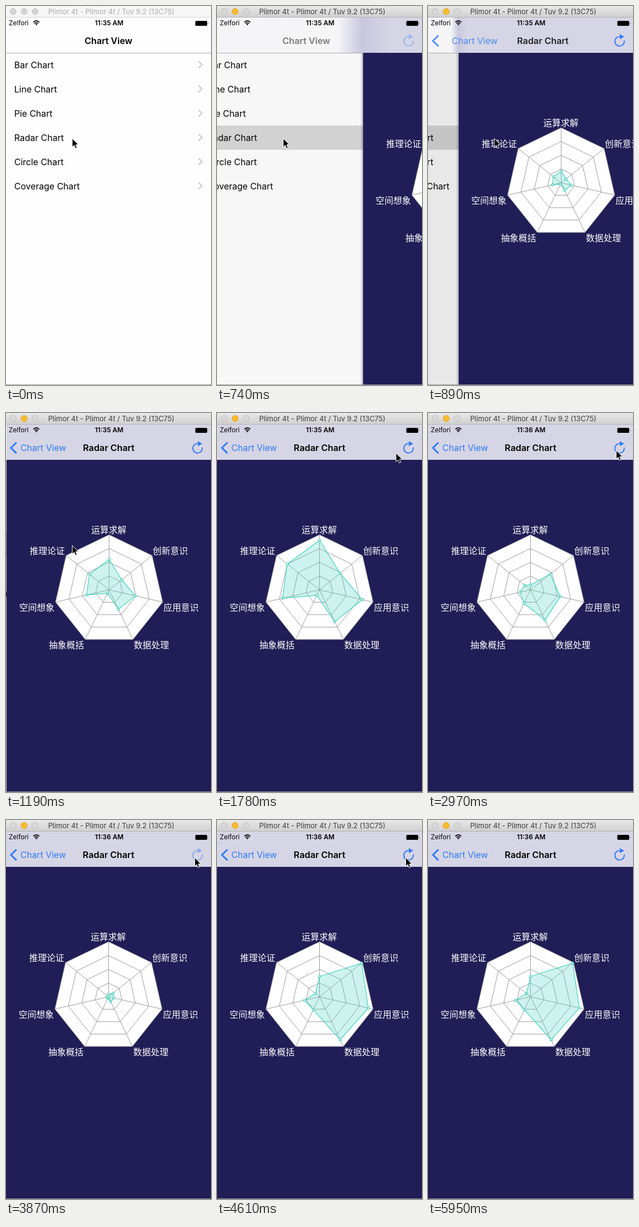
An HTML page that plays this animation: 373x688 px, repeating every 6220 ms.

```html
<!DOCTYPE html>
<html lang="en">
<head>
<meta charset="utf-8">
<title>Chart View</title>
<style>
  html, body { margin: 0; width: 100%; height: 100%; overflow: hidden; background: #fff; }
  svg { display: block; width: 100%; height: 100%; }
  text { font: 16px Inter, Roboto, sans-serif; }
  .mid { text-anchor: middle; }
  .title { font-size: 16.3px; font-weight: 600; }
  .status { font-size: 12px; }
  .bold { font-weight: 600; }
  .window { font-size: 12.9px; }
  .label { font: 16px "Noto Sans CJK SC", "Noto Sans CJK", sans-serif; fill: #fff; }
  .blue { fill: #2f7bf6; }
  .line { fill: none; stroke: #2f7bf6; }
  .web { fill: none; stroke: #9b9b9f; stroke-width: 1; }
  .data { fill: #3fd0bb; fill-opacity: .25; stroke: #3fd3be; stroke-width: 1.2; stroke-linejoin: round; }
  .dot { fill: #fff; stroke: #3fcdb9; stroke-width: 1.2; }
</style>
</head>
<body>
<svg viewBox="0 0 373 688" preserveAspectRatio="none">
  <defs>
    <linearGradient id="active" x2="0" y2="1">
      <stop stop-color="#e9e8e9"/><stop offset="1" stop-color="#d1d0d1"/>
    </linearGradient>
    <linearGradient id="shade">
      <stop stop-color="#000" stop-opacity="0"/><stop offset="1" stop-color="#000" stop-opacity=".22"/>
    </linearGradient>
    <linearGradient id="glass" gradientUnits="userSpaceOnUse" y1="0" y2="0">
      <stop stop-color="#f5f5f7"/><stop offset=".45" stop-color="#c8c7df"/><stop offset="1" stop-color="#d6d5e5"/>
    </linearGradient>
  </defs>

  <g id="list">
    <rect y="85" width="373" height="603" fill="#fefefe"/>
    <rect id="pressed" y="217" width="373" height="44" fill="#d8d8d8"/>
    <g id="rows"></g>
  </g>
  <rect id="dim" y="85" width="373" height="603"/>

  <g id="page">
    <rect x="-5" y="85" width="5" height="603" fill="url(#shade)"/>
    <rect y="85" width="374" height="603" fill="#211d56"/>
    <g id="web"></g>
    <g id="data"></g>
  </g>

  <rect y="20" width="373" height="65" fill="#fdfdfd"/>
  <rect id="bar" y="20" width="373" height="65" fill="url(#glass)"/>
  <rect id="rule" y="85" width="373" height="1" fill="#aaa9ad"/>
  <rect y="687" width="373" height="1" fill="#98979d"/>

  <text id="oldTitle" class="title mid" x="186.5" y="69">Chart View</text>
  <path id="back" class="line" stroke-width="3" d="M19 53.5L9 63.3L19 73.1"/>
  <text id="backText" class="blue" x="26" y="69">Chart View</text>
  <text id="newTitle" class="title mid" x="186.5" y="69">Radar Chart</text>
  <g id="refresh">
    <path class="line" stroke-width="2" d="M348.5 55.5A8.6 8.6 0 1 0 357 62.5"/>
    <path class="blue" d="M349 51L357 55.8L349 60.3Z"/>
  </g>

  <text class="status" x="5" y="35.3">Zelfori</text>
  <g fill="none" stroke="#000" stroke-width="1.8">
    <path d="M49.7 29.4Q55.2 24.6 60.7 29.4M51.9 31.8Q55.2 28.9 58.5 31.8"/>
    <path d="M53.3 33L55.2 35.2L57.1 33Q55.2 31.7 53.3 33Z" fill="#000" stroke="none"/>
  </g>
  <text id="clock" class="status bold mid" x="187.7" y="35.3"></text>
  <rect x="344.5" y="27" width="21.5" height="9" rx="1.5"/>
  <path d="M367 29.7Q368.6 31.5 367 33.3Z"/>

  <rect id="frame" width="373" height="20"/>
  <rect id="frameEdge" y="20" width="373" height="1"/>
  <g id="lights"></g>
  <text id="caption" class="window mid" x="191.5" y="15">Plimor 4t - Plimor 4t / Tuv 9.2 (13C75)</text>

  <path id="cursor" d="M0 0V15.6L3.6 12.3L6 17.9L8.7 16.8L6.3 11.3H11.2Z" stroke="#fff" stroke-width="1"/>
</svg>

<script>
const LOOP = 6220, STEP = 14.875, WIDTH = 373, GROW = 800;
const CX = 186.5, CY = 321, RADIUS = 100, SIDES = 7;
const $ = id => document.getElementById(id);
const clamp = v => Math.max(0, Math.min(1, v));
const set = (el, attrs) => { for (const k in attrs) el.setAttribute(k, attrs[k]); return el; };
const add = (parent, tag, attrs, text = '') => {
  const el = set(document.createElementNS('http://www.w3.org/2000/svg', tag), attrs);
  el.textContent = text;
  return parent.appendChild(el);
};
const spoke = (i, v) => {
  const a = i * 2 * Math.PI / SIDES;
  return [CX + RADIUS * v * Math.sin(a), CY - RADIUS * v * Math.cos(a)];
};
const ring = values => values.map((v, i) => spoke(i, v).map(n => n.toFixed(2))).join(' ');

// Each run grows from the centre, starting at the given time.
const runs = [
  { start: 702, values: [.9, .48, .8, .64, .11, .69, .75] },
  { start: 2288, values: [.13, .68, .82, .9, .4, .29, .2] },
  { start: 3782, values: [.37, .98, .91, .865, .26, .28, .095] }
];
const presses = [2230, 3720];

// Pointer path: time, x, y
const path = [
  [0, 120.5, 240.5], [1190, 120.5, 240.5], [1340, 152, 220], [1480, 262, 130],
  [1630, 325, 73], [1780, 336, 71], [1930, 342.5, 68], [3120, 342.5, 68],
  [3720, 343.5, 68.5], [4610, 343.5, 68.5], [5060, 345, 80], [5210, 350, 130],
  [5360, 345, 230], [5500, 322, 370], [5650, 292, 520], [5800, 262, 660], [5950, 250, 700]
];

['Bar', 'Line', 'Pie', 'Radar', 'Circle', 'Coverage'].forEach((name, i) => {
  const y = 106.5 + 44 * i;
  add($('rows'), 'text', { x: 15, y: y + 6 }, name + ' Chart');
  add($('rows'), 'path', {
    d: `M350.5 ${y - 6}L356.5 ${y}L350.5 ${y + 6}`, fill: 'none', stroke: '#c7c7cc', 'stroke-width': 1.9
  });
});

const lights = [13, 33, 53].map(cx => add($('lights'), 'circle', { cx, cy: 10, r: 5.6 }));

add($('web'), 'polygon', { points: ring(Array(SIDES).fill(1)), fill: '#fff' });
for (let k = 1; k <= 4; k++)
  add($('web'), 'polygon', { points: ring(Array(SIDES).fill(k / 4)), class: 'web' });
for (let i = 0; i < SIDES; i++) {
  const [x2, y2] = spoke(i, 1);
  add($('web'), 'line', { x1: CX, y1: CY, x2, y2, class: 'web' });
}
[
  ['运算求解', 154, 212], ['创新意识', 266, 250], ['应用意识', 285.5, 353], ['数据处理', 231.5, 421],
  ['抽象概括', 77, 421], ['空间想象', 23, 353], ['推理论证', 42, 250]
].forEach(([s, x, y]) => add($('web'), 'text', { x, y: y + 6, class: 'label' }, s));

const area = add($('data'), 'polygon', { class: 'data' });
const dots = runs[0].values.map(() => add($('data'), 'circle', { r: 2, class: 'dot' }));

const tickTime = k => 10 * Math.round(k * STEP);
function snap(t) {
  let k = Math.floor(t / (10 * STEP)) + 1;
  while (tickTime(k) > t) k--;
  return tickTime(k);
}

function push(t) {
  const w = Math.max(0, t - 671) * .01542;
  const p = 1 - (1 + w) * Math.exp(-w);
  return p > .998 ? 1 : p;
}

function drawWindow(active) {
  set($('frame'), { fill: active ? 'url(#active)' : '#f6f6f6' });
  set($('frameEdge'), { fill: active ? '#b3b2b6' : '#d5d5d5' });
  set($('caption'), { fill: active ? '#3c3c3c' : '#adadad' });
  lights.forEach((el, i) => set(el, !active ? { fill: '#d3d3d3', stroke: '#cacaca' }
    : i === 1 ? { fill: '#f8bd2f', stroke: '#e0a32a' } : { fill: '#d9d8d9', stroke: '#bfbebf' }));
}

function drawPush(t) {
  const p = push(t), edge = WIDTH * (1 - p), shift = -116 * .72 * p;
  const late = clamp((p - .35) / .6);
  set($('list'), { transform: `translate(${-.3 * WIDTH * p})` });
  set($('pressed'), { opacity: t >= 600 ? 1 : 0 });
  set($('dim'), { opacity: .1 * p });
  set($('page'), { transform: `translate(${edge})`, opacity: p > 0 ? 1 : 0 });
  set($('rule'), { width: edge });
  set($('bar'), { opacity: p > 0 ? 1 : 0 });
  const blur = Math.min(1, (1 - p) * 2);
  set($('glass'), { x1: edge - 45 * blur, x2: edge + 50 * blur + .01 });
  set($('oldTitle'), { transform: `translate(${shift})`, opacity: clamp(1 - 1.75 * p) });
  set($('backText'), { transform: `translate(${116 * (1 - p)})`, opacity: late });
  set($('back'), { opacity: late });
  set($('newTitle'), { transform: `translate(${150 * (1 - p)})`, opacity: late });
  return p;
}

function drawData(t) {
  const run = runs.filter(r => t >= r.start).pop();
  set($('data'), { opacity: run ? 1 : 0 });
  if (!run) return;
  const grown = clamp((t - run.start) / GROW);
  const values = run.values.map(v => v * grown);
  set(area, { points: ring(values) });
  dots.forEach((dot, i) => {
    const [cx, cy] = spoke(i, values[i]);
    set(dot, { cx, cy });
  });
}

function drawCursor(t) {
  let i = path.findIndex(p => p[0] > t);
  if (i < 0) i = path.length - 1;
  const [t0, x0, y0] = path[i - 1], [t1, x1, y1] = path[i];
  const f = clamp((t - t0) / (t1 - t0));
  set($('cursor'), { transform: `translate(${x0 + (x1 - x0) * f} ${y0 + (y1 - y0) * f})` });
}

function draw(t) {
  drawWindow(t >= 600);
  const p = drawPush(t);
  const held = presses.map(s => t - s).find(d => d >= 0 && d < 400);
  set($('refresh'), { opacity: held === undefined ? clamp(1.25 * p) : held < 250 ? .45 : .75 });
  $('clock').textContent = t < 2680 ? '11:35 AM' : '11:36 AM';
  drawData(t);
  drawCursor(t);
}

const began = performance.now();
function loop() {
  draw(snap((performance.now() - began) % LOOP));
  requestAnimationFrame(loop);
}
loop();
</script>
</body>
</html>
```
